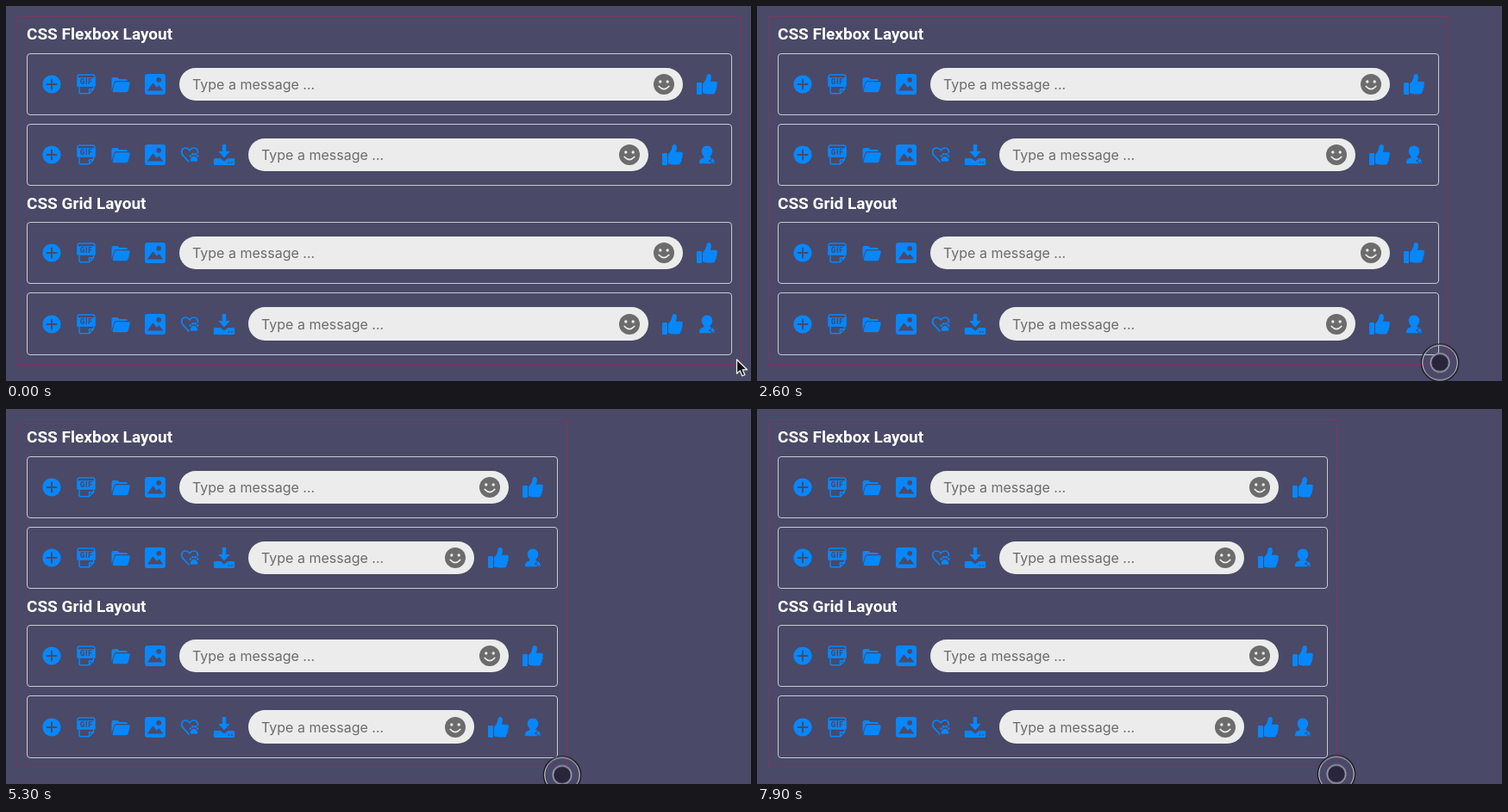
Animation, 864 px wide and 436 px high, one loop 8000 ms. Source, as an HTML page:

```html
<!DOCTYPE html>
<html lang="en">
<head>
<meta charset="utf-8">
<title>Flexbox and grid message bars</title>
<style>
  :root { --bg: #4a4967; --blue: #0787fc; --pill: #ececec; }
  * { box-sizing: border-box; }
  html, body { margin: 0; width: 100%; height: 100%; overflow: hidden; background: var(--bg); }
  body { position: relative; }

  .box {
    position: absolute; left: 13px; top: 12px; width: 840px; height: 405px;
    border: 1px solid #79375f; overflow: hidden;
    animation: resize 8s linear infinite;
  }
  h2 {
    position: absolute; left: 10px; margin: 0; white-space: nowrap;
    font: 700 19px/24px Roboto, "Open Sans", sans-serif; color: #fff;
  }
  .bar {
    position: absolute; left: 10px; right: 10px; min-width: 597px; height: 72.4px;
    padding: 0 16px; border: 1px solid #c9c9d4; border-radius: 4px;
    gap: 16px; align-items: center; color: var(--blue);
  }
  .flex { display: flex; }
  .flex .pill { flex: 1; }
  .grid { display: grid; }
  .grid.short { grid-template-columns: repeat(4, 24px) 1fr 24px; }
  .grid.long { grid-template-columns: repeat(6, 24px) 1fr repeat(2, 24px); }
  .pill {
    display: flex; align-items: center; justify-content: space-between;
    height: 38.4px; padding: 0 10px 0 15px; border-radius: 20px; background: var(--pill);
    font: 16px/20px Inter, "Noto Sans", sans-serif; color: #6c6c6c; white-space: nowrap;
  }
  svg { display: block; overflow: visible; }
  .bar svg { width: 24px; height: 24px; flex: none; }

  .cursor { position: absolute; left: 0; top: 0; animation: move 8s linear infinite; }
  .cursor svg { position: absolute; left: -30px; top: -30px; width: 60px; height: 60px; }
  .arrow { animation: hide 8s step-end infinite; }
  .press { animation: show 8s step-end infinite; }

  @keyframes resize {
    0%, 23.125% { width: 840px; }
    26.25% { width: 822px; }
    33.75% { width: 782px; }
    40% { width: 765px; }
    45% { width: 710px; }
    52.5% { width: 674px; }
    56.25% { width: 638px; }
    61.25% { width: 633px; }
    65%, 67.5% { width: 638px; }
    77.5% { width: 606px; }
    83.75% { width: 603px; }
    90% { width: 617px; }
    97.5% { width: 661px; }
    98.75%, 100% { width: 660px; }
  }
  @keyframes move {
    0% { transform: translate(847px, 411px); }
    6% { transform: translate(850px, 416px); }
    12% { transform: translate(848px, 412px); }
    23.125% { transform: translate(845px, 411px); }
    26.25% { transform: translate(827.5px, 413px); }
    33.75% { transform: translate(785px, 415px); }
    40% { transform: translate(768.5px, 418.5px); }
    45% { transform: translate(715px, 421px); }
    52.5% { transform: translate(681.5px, 425.5px); }
    56.25% { transform: translate(650px, 425px); }
    61.25% { transform: translate(640px, 425px); }
    65%, 67.5% { transform: translate(645px, 425.5px); }
    77.5% { transform: translate(610px, 426.5px); }
    83.75% { transform: translate(608px, 426px); }
    90% { transform: translate(626px, 425px); }
    97.5% { transform: translate(673.5px, 424px); }
    98.75%, 100% { transform: translate(672px, 424.5px); }
  }
  @keyframes hide { 0% { opacity: 1; } 23.125%, 100% { opacity: 0; } }
  @keyframes show { 0% { opacity: 0; } 23.125%, 100% { opacity: 1; } }
</style>
</head>
<body>
<svg width="0" height="0" style="position:absolute">
  <defs>
    <g id="plus">
      <circle cx="12" cy="12" r="10.6" fill="currentColor"/>
      <path d="M12 6.5v11M6.5 12h11" stroke="var(--bg)" stroke-width="2" stroke-linecap="round"/>
    </g>
    <g id="gif">
      <path d="M2.2 14V3q0-2 2-2h15.600q2 0 2 2v11" fill="none" stroke="currentColor" stroke-width="1.500"/>
      <path d="M1.500 4.200h21v10.600h-21z" fill="currentColor"/>
      <path d="M4 15v6q0 1.800 2 1.800h9.500l5-5V15M15.500 22.500v-4.700h5" fill="none" stroke="currentColor" stroke-width="1.500" stroke-linejoin="round"/>
      <text x="12" y="12.300" text-anchor="middle" font-family="Roboto, sans-serif" font-size="8.200" font-weight="900" letter-spacing=".7" fill="var(--bg)">GIF</text>
    </g>
    <g id="folder">
      <path d="M1.500 19V6q0-2 2-2h5l2 2h7.500q2 0 2 2H7q-1.800 0-2.400 1.700z" fill="currentColor"/>
      <path d="M7.500 9.200H21q2.200 0 1.700 2l-2 8q-.5 2-2.300 2H4.300q-2.100 0-1.600-2l2.200-8.200q.5-1.800 2.600-1.800z" fill="currentColor"/>
    </g>
    <g id="image">
      <rect width="24" height="24" rx="3" fill="currentColor"/>
      <circle cx="16.200" cy="6.800" r="2.900" fill="var(--bg)"/>
      <path d="M3 19.500l5.600-8.300q.8-1.100 1.700 0l3.600 4.700 1.700-1.900q.8-.8 1.500 0l4 5.500z" fill="var(--bg)"/>
    </g>
    <g id="heart">
      <path d="M11 20L4.400 12.900C1 9 3.200 4 7 4q2.800 0 5 2.800Q14.200 4 17 4c3 0 5 2.600 4.400 5.700" fill="none" stroke="currentColor" stroke-width="1.700" stroke-linecap="round"/>
      <g fill="currentColor">
        <path d="M17 13.800c2.200 0 4.600 3 4.300 4.700-.3 2-2.500 1-4.300 1s-4 1-4.300-1c-.3-1.700 2.100-4.700 4.300-4.700z"/>
        <circle cx="12.800" cy="13.500" r="1.300"/><circle cx="15.400" cy="11.300" r="1.400"/>
        <circle cx="18.700" cy="11.300" r="1.400"/><circle cx="21.300" cy="13.500" r="1.300"/>
      </g>
    </g>
    <g id="download" fill="currentColor">
      <path d="M9.800 0h4.400v8h4.600L12 15.500 5.200 8h4.600z"/>
      <path d="M1 16h6.500l4.500 3.500 4.500-3.500H23q1.200 0 1.200 1.200v5.600Q24.200 24 23 24H1Q-.2 24-.2 22.800v-5.600Q-.2 16 1 16z"/>
      <path d="M16.700 21h1.700M20 21h1.700" stroke="var(--bg)" stroke-width="1.500"/>
    </g>
    <g id="thumb" fill="currentColor">
      <rect y="10" width="6" height="14" rx="1.200"/>
      <path d="M7 11.500c2.600-2.600 4.200-5 4.500-8.800C11.700.8 12.700 0 14 0c2.200 0 3.200 2 2.900 4.500-.2 1.700-.7 3-1.200 4.300h6q2.300 0 2.300 2.200 0 1.300-.9 2 .7.800.5 2-.2 1.200-1.100 1.800.4 1 .1 2-.3 1.100-1.200 1.600.2 3-2.900 3h-6c-2.500 0-4-.4-5.500-1.400z"/>
    </g>
    <g id="person" fill="currentColor">
      <path d="M12 1.600c4 0 6.200 2.900 6.200 6.400 0 2.500-1.200 4.500-2.700 5.700v1.500c2.600.8 4.500 1.700 5 3.300.5 1.400.5 3.700.5 3.700H3s0-2.300.5-3.700c.5-1.600 2.400-2.500 5-3.300v-1.500C7 12.500 5.800 10.500 5.800 8c0-3.500 2.200-6.400 6.200-6.400z"/>
      <path d="M18.500 14.700l1.300 3 3 1.300-3 1.300-1.300 3-1.300-3-3-1.300 3-1.300z" stroke="var(--bg)" stroke-width="1"/>
    </g>
    <g id="smile">
      <circle cx="12" cy="12" r="12" fill="currentColor"/>
      <g fill="var(--pill)"><circle cx="7.800" cy="9" r="1.700"/><circle cx="16.200" cy="9" r="1.700"/></g>
      <path d="M6.300 14.500q5.700 6.200 11.400 0" fill="none" stroke="var(--pill)" stroke-width="1.800" stroke-linecap="round"/>
    </g>
  </defs>
</svg>

<div class="box">
  <h2 style="top:8px">CSS Flexbox Layout</h2>
  <h2 style="top:204.500px">CSS Grid Layout</h2>
</div>

<div class="cursor">
  <svg class="arrow" viewBox="-30 -30 60 60">
    <path d="M.5 0v16.300l3.700-3.400 2.600 6.100 3-1.300-2.600-5.900h5.200z" fill="#111" stroke="#fff" stroke-width="1.200" stroke-linejoin="round"/>
  </svg>
  <svg class="press" viewBox="-30 -30 60 60">
    <g fill="none">
      <circle r="21.500" stroke="#17161f" stroke-width="1.500"/>
      <circle r="20.300" stroke="#d5d5dc" stroke-width="1"/>
    </g>
    <circle r="10.700" fill="#29263c" stroke="#9594a8" stroke-width="1.800"/>
  </svg>
</div>

<script>
  const icon = name => `<svg viewBox="0 0 24 24"><use href="#${name}"/></svg>`;
  const icons = names => names.map(icon).join("");
  const pill = `<div class="pill"><span>Type a message ...</span>${icon("smile")}</div>`;
  const start = ["plus", "gif", "folder", "image"];

  const sets = {
    short: icons(start) + pill + icon("thumb"),
    long: icons([...start, "heart", "download"]) + pill + icons(["thumb", "person"])
  };

  // Tops are measured inside the box border.
  const addBar = (layout, size, top) =>
    document.querySelector(".box").insertAdjacentHTML("beforeend",
      `<div class="bar ${layout} ${size}" style="top:${top}px">${sets[size]}</div>`);

  addBar("flex", "short", 41.5);
  addBar("flex", "long", 123.9);
  addBar("grid", "short", 238);
  addBar("grid", "long", 320.4);
</script>
</body>
</html>
```
